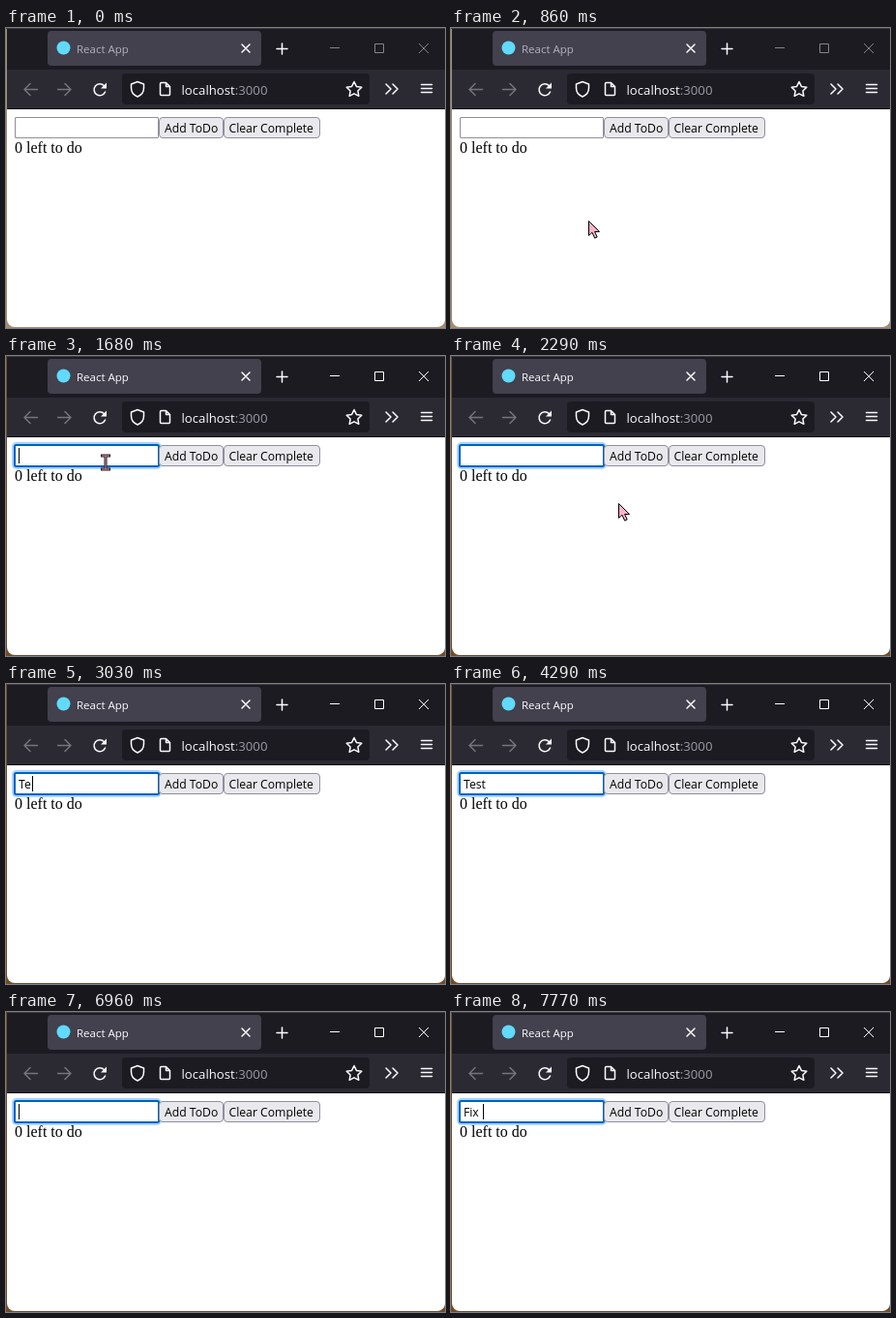
Write an HTML page that moves like this. It is 454x310 px and loops after 8 s.

```html
<!DOCTYPE html>
<html lang="en">
<head>
<meta charset="utf-8">
<title>React App</title>
<style>
  html, body { margin: 0; width: 100%; height: 100%; overflow: hidden; }
  svg { display: block; width: 454px; height: 310px; }
  text { font-family: "Open Sans", "Noto Sans", sans-serif; white-space: pre; }
  .ui { font-size: 12.2px; fill: #000; }
  .icon { fill: none; stroke: #fbfbfe; stroke-width: 1.5; stroke-linecap: round; stroke-linejoin: round; }
  .off { stroke: #74737e; }
  .button { fill: #e9e9ed; stroke: #8f8f9d; }
  #desk { fill: #a58d6b; }
  #title { fill: #b3b1be; font-size: 11.5px; }
  #controls { fill: none; stroke: #85848c; }
  .active #desk { fill: #714d28; }
  .active #title { fill: #fbfbfe; }
  .active #controls { stroke: #fff; }
  #field { fill: #fff; stroke: #8f8f9d; }
  .hover #field { stroke: #676774; }
  #ring, #caret { visibility: hidden; }
  .focus #ring { visibility: visible; }
</style>
</head>
<body>
<svg id="stage" viewBox="0 0 454 310">
  <defs>
    <clipPath id="frame"><path d="M1 0H454V302a8 8 0 0 1-8 7H9a8 8 0 0 1-8-8Z"/></clipPath>
  </defs>
  <rect id="desk" width="454" height="310"/>
  <g clip-path="url(#frame)">
    <rect width="454" height="310" fill="#fff"/>
    <rect width="454" height="43" fill="#1c1b22"/>
    <rect y="43" width="454" height="41" fill="#2b2a33"/>
    <rect y="83" width="454" height="1" fill="#0c0c0d"/>
    <rect x="43" y="3" width="221" height="36" rx="4" fill="#42414d"/>
    <rect x="120" y="47" width="256" height="32" rx="4" fill="#1c1b22"/>
  </g>
  <rect width="454" height="1" fill="#3a3940"/>

  <circle cx="59.5" cy="20.5" r="7" fill="#61dafb"/>
  <text id="title" x="73" y="26">React App</text>
  <path class="icon" stroke-width="1.2" d="M244 17l8 8m0-8l-8 8M280 21.5h11M285.5 16v11"/>
  <path id="controls" d="M335 20.5h10M381.500 16.500h9v9h-9zM427 16l10 10m0-10l-10 10"/>

  <path class="icon off" d="M32.500 63.500H19M25 57.500l-6 6 6 6M53.500 63.500H67M61 57.500l6 6-6 6"/>
  <path class="icon" d="M102.600 66A6 6 0 1 1 101.400 59.500"/>
  <path fill="#fbfbfe" d="M104 56.500v6h-6z"/>
  <path class="icon" d="M136 55.500l6.500 2.500v4c0 4.600-2.800 7.500-6.500 9-3.700-1.500-6.500-4.400-6.500-9v-4z"/>
  <path class="icon" d="M165.500 56.500h-5a1 1 0 0 0-1 1v11a1 1 0 0 0 1 1h8a1 1 0 0 0 1-1v-8zv4h4"/>
  <text x="181.500" y="69" font-size="13.200" fill="#fbfbfe">localhost<tspan fill="#9b9aa5">:3000</tspan></text>
  <path class="icon" d="M360 55.500l2.400 4.900 5.400.8-3.900 3.800.9 5.300-4.800-2.500-4.800 2.500.9-5.300-3.900-3.800 5.400-.8z"/>
  <path class="icon" d="M393 58l5 5-5 5M400 58l5 5-5 5"/>
  <path class="icon" d="M429.500 58.500h11M429.500 62.500h11M429.500 66.500h11"/>

  <rect id="field" x="9.500" y="92.500" width="148" height="21" rx=".5"/>
  <g id="ring">
    <rect x="6" y="89" width="155" height="28" rx="5" fill="#a5d5fa"/>
    <rect x="9" y="92" width="149" height="22" rx="1.500" fill="#fff" stroke="#0060c8" stroke-width="2"/>
  </g>
  <rect class="button" x="158.500" y="92.500" width="66" height="21" rx="3.500"/>
  <rect class="button" x="225.500" y="92.500" width="99" height="21" rx="3.500"/>
  <text class="ui" x="164" y="108">Add ToDo</text>
  <text class="ui" x="230.500" y="108">Clear Complete</text>
  <text id="typed" class="ui" x="13" y="108"></text>
  <rect id="caret" x="13" y="95" width="1" height="16"/>
  <text x="9" y="129" style="font:16px 'Liberation Serif',serif">0 left to do</text>

  <path id="arrow" fill="#ffb3c6" stroke="#000" d="M.5.5V15.500L4 12.300 6.700 18.200 9.200 17 6.600 11.500H11.500Z"/>
  <g id="beam">
    <path fill="none" stroke="#20161a" stroke-width="3" d="M-5-7H5M-5 7H5M0-7V7"/>
    <path fill="none" stroke="#d99aaa" d="M-4-7H4M-4 7H4M0-7V7"/>
  </g>
</svg>
<script>
const LOOP = 8000;
const $ = id => document.getElementById(id);

// [time, x, y, shape]
const pointer = [
  [0, 0, 0, ''],
  [650, 442, 255, 'arrow'], [720, 325, 243, 'arrow'], [790, 214, 224, 'arrow'],
  [860, 142, 199, 'arrow'], [930, 121, 174, 'arrow'], [1000, 112, 153, 'arrow'],
  [1070, 107, 136, 'arrow'], [1140, 105, 124, 'arrow'], [1210, 104, 113, 'beam'],
  [1280, 103, 111, 'beam'], [1350, 103, 110, 'beam'],
  [2150, 119, 112, 'beam'], [2220, 151, 130, 'arrow'], [2290, 173, 152, 'arrow'],
  [2360, 184, 178, 'arrow'], [2430, 189, 199, 'arrow'], [2500, 191, 210, 'arrow'],
  [2770, 0, 0, '']
];
// [time, text, caret x]
const typing = [
  [0, '', 13], [2770, 'T', 20], [3030, 'Te', 27], [3300, 'Tes', 33], [3560, 'Test', 37],
  [4950, 'Tes', 33], [5020, 'Te', 27], [5240, 'T', 20], [5370, '', 13],
  [7090, 'F', 20], [7360, 'Fi', 23], [7430, 'Fix', 29], [7770, 'Fix ', 33]
];
// The caret toggles at each of these times, starting hidden.
const blinks = [1680, 2150, 2700, 3230, 3760, 4290, 4820, 5370, 5900, 6430, 6960, 7500, 7770];

const at = (table, t) => table.findLast(row => row[0] <= t);
const show = (el, on) => { el.style.visibility = on ? 'visible' : 'hidden'; };

function draw(t) {
  const [, x, y, shape] = at(pointer, t);
  for (const id of ['arrow', 'beam']) {
    show($(id), id === shape);
    $(id).setAttribute('transform', `translate(${x} ${y})`);
  }

  const [, text, caretX] = at(typing, t);
  if ($('typed').textContent !== text) $('typed').textContent = text;
  $('caret').setAttribute('x', caretX);
  show($('caret'), blinks.filter(b => b <= t).length % 2);

  const state = $('stage').classList;
  state.toggle('hover', shape === 'beam');
  state.toggle('active', t >= 1610);
  state.toggle('focus', t >= 1680);
}

const start = performance.now();
function tick() {
  draw((performance.now() - start) % LOOP);
  requestAnimationFrame(tick);
}
tick();
</script>
</body>
</html>
```
